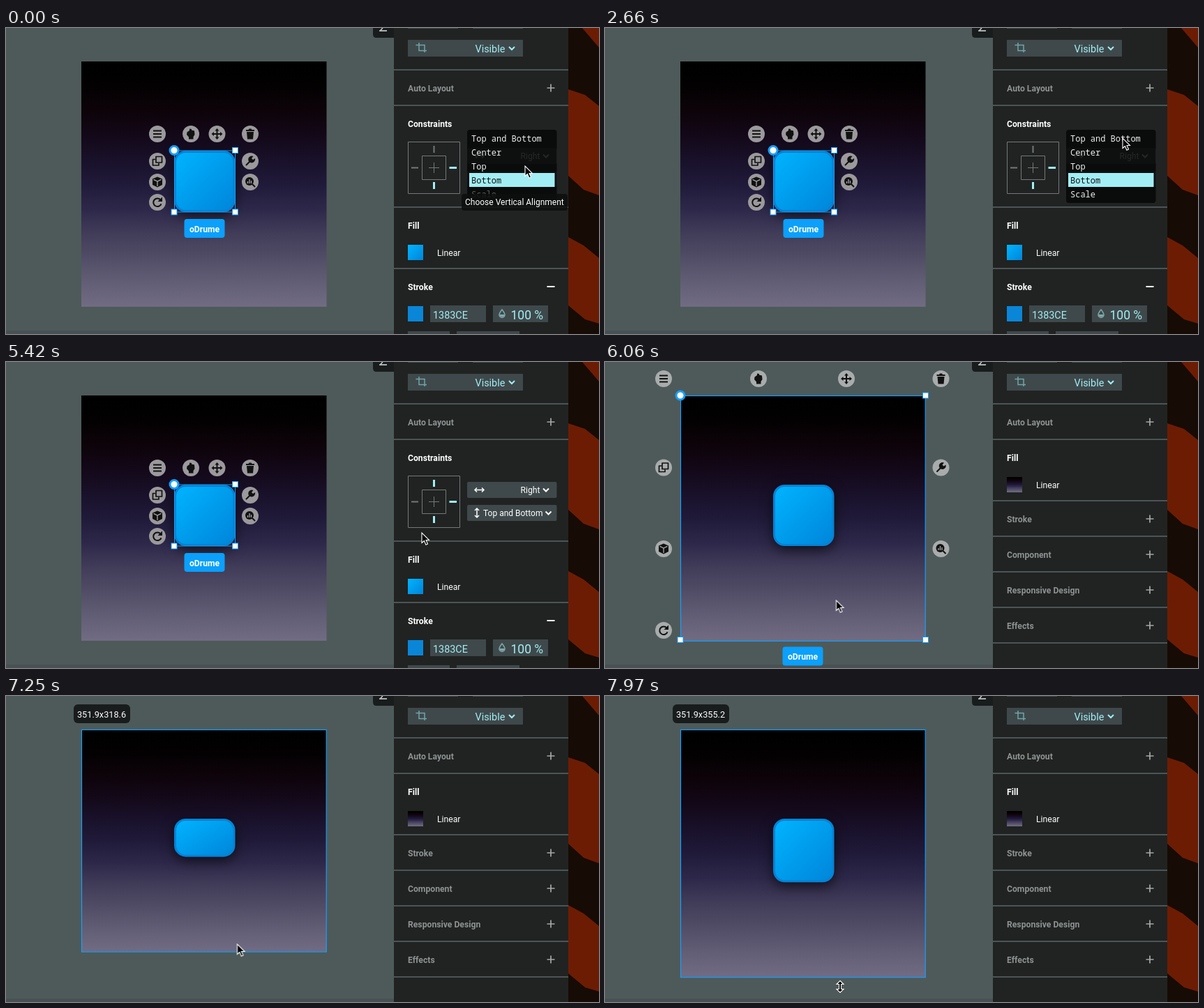
Write an HTML page that moves like this. It is 850 by 439 pixels and loops after 8000 ms.

```html
<!DOCTYPE html>
<html lang="en">
<head>
<meta charset="utf-8">
<title>Layout constraints</title>
<style>
html, body { margin: 0; width: 100%; height: 100%; overflow: hidden; background: #4e5a59; }
svg { display: block; }
text { font: 12.2px Roboto, sans-serif; fill: #fff; }
.b { font-weight: 700; }
.dim { fill: #8e9292; }
.mono text { font: 12px "Noto Sans Mono", monospace; fill: #eee; }
.cyan { fill: #a2eef5; }
.field { fill: #3f494b; }
.rule { stroke: #4d5455; stroke-width: 2; }
.line { fill: none; stroke: #747878; }
.blue { fill: none; stroke: #159fff; }
.knob rect { fill: #fff; stroke: #159fff; }
.knob circle { fill: #fff; stroke: #159fff; stroke-width: 3; }
.tag { fill: #0aa0fb; }
.glyph { fill: none; stroke: #111; stroke-width: 2; }
.solid { fill: #111; stroke: none; }

#board, #outline { height: calc(var(--h) * 1px); }
#tile { height: calc(var(--h) * 1px - 266.9px); filter: drop-shadow(0 5px 9px #000a); }

.tool, .menu, .tip, .scale, .before, .after, .picked, .drag, .topOn, .arrow, .resize {
  animation: 8s step-end infinite;
}
.before { animation-name: before; }
.after { animation-name: after; }
.picked { animation-name: picked; }
.drag { animation-name: drag; }
.menu { animation-name: menu; }
.topOn { animation-name: topOn; }
.arrow { animation-name: arrow; }
.resize { animation-name: resize; }
.tip { animation-name: tip; animation-timing-function: linear; }
.scale { animation-name: scale; animation-timing-function: linear; }
.cursor { animation: move 8s step-end infinite; }

@keyframes before { 75.75%, to { visibility: hidden; } }
@keyframes after { 0% { visibility: hidden; } 75.75%, to { visibility: visible; } }
@keyframes picked { 0%, 86.875%, to { visibility: hidden; } 75.75% { visibility: visible; } }
@keyframes drag { 0% { visibility: hidden; } 86.875%, to { visibility: visible; } }
@keyframes menu { 39.125%, to { visibility: hidden; } }
@keyframes topOn { 0% { visibility: hidden; } 39.125%, 75.74% { visibility: visible; } 75.75%, to { visibility: hidden; } }
@keyframes arrow { 81.625%, 98.125%, to { visibility: hidden; } 86.875% { visibility: visible; } }
@keyframes resize { 0%, 86.875% { visibility: hidden; } 81.625%, 98.125%, to { visibility: visible; } }
@keyframes tip { 0%, .75% { opacity: 1; } 4.25%, to { opacity: 0; } }
@keyframes scale { 0%, .75% { opacity: .35; } 4.25%, to { opacity: 1; } }
@keyframes move {
  0% { transform: translate(744px, 198px); }
  25.25% { transform: translate(752px, 215px); }
  26% { transform: translate(752px, 217px); animation-timing-function: steps(10); }
  33.25% { transform: translate(742px, 158px); }
  46.625% { transform: translate(701px, 146px); animation-timing-function: steps(2); }
  47.9% { transform: translate(632px, 141px); animation-timing-function: steps(2); }
  49.2% { transform: translate(583px, 155px); animation-timing-function: steps(2); }
  50.875% { transform: translate(616px, 178px); }
  55.25% { transform: translate(616px, 178px); animation-timing-function: steps(8, start); }
  60.25% { transform: translate(617px, 224px); }
  67.75% { transform: translate(596px, 245px); animation-timing-function: steps(7); }
  72.75% { transform: translate(331.5px, 342px); }
  78.75% { transform: translate(331.5px, 342px); animation-timing-function: steps(6, start); }
  82.375% { transform: translate(331.5px, 400px); }
  86.875% { transform: translate(331.5px, 398px); animation-timing-function: steps(5); }
  90.625% { transform: translate(331.5px, 356px); animation-timing-function: steps(4); }
  93.625% { transform: translate(331.5px, 334px); }
  95.875% { transform: translate(331.5px, 341px); animation-timing-function: steps(5); }
  99.625%, to { transform: translate(337px, 417px); }
}
</style>
</head>
<body>
<svg width="850" height="439" viewBox="0 0 850 439" style="--h: 351.9">
  <defs>
    <linearGradient id="dusk" x2="0" y2="1">
      <stop stop-color="#000"/>
      <stop offset=".1" stop-color="#030102"/>
      <stop offset=".2" stop-color="#0d0309"/>
      <stop offset=".3" stop-color="#130818"/>
      <stop offset=".4" stop-color="#19112a"/>
      <stop offset=".5" stop-color="#201a39"/>
      <stop offset=".6" stop-color="#2d2849"/>
      <stop offset=".7" stop-color="#413c58"/>
      <stop offset=".8" stop-color="#514d66"/>
      <stop offset=".9" stop-color="#625e76"/>
      <stop offset="1" stop-color="#716c84"/>
    </linearGradient>
    <linearGradient id="sky" x2="1" y2="1">
      <stop stop-color="#00b4ff"/>
      <stop offset="1" stop-color="#0085da"/>
    </linearGradient>
    <path id="plus" d="M-5.5 0H5.5M0-5.5V5.5" fill="none" stroke="#a5a8a8" stroke-width="1.7"/>
    <path id="chev" d="M-4-2 0 2 4-2" fill="none" stroke-width="2"/>

    <g id="menu" class="glyph"><path d="M-6-4.5H6M-6 0H6M-6 4.5H6"/></g>
    <path id="hand" class="solid" d="M-5.5-2.5-2-5V-7.5L1-7V-5.5L5-4.5 5.5 1 3.5 4V7.5H-3V4.5L-6 1Z"/>
    <g id="pan"><path class="glyph" d="M-6 0H6M0-6V6"/>
      <path class="solid" d="M0-8 3-4.5H-3ZM0 8 3 4.5H-3ZM-8 0-4.5-3V3ZM8 0 4.5-3V3Z"/></g>
    <path id="trash" class="solid" d="M-6-6H-2.5L-1.5-7.5H1.5L2.5-6H6V-4H-6ZM-5-3H5L4 7.5H-4Z"/>
    <g id="copy" class="glyph" stroke-linejoin="round"><path d="M-2-6.5H6.5V2H-2ZM-3-2.5H-6.5V6H2V3" stroke-width="1.7"/></g>
    <g id="wrench"><path class="glyph" d="M-5.5 5.5 2-2" stroke-width="3.4" stroke-linecap="round"/>
      <path class="solid" d="M4.5-7A5 5 0 1 0 7-4L4-2 2-4Z"/></g>
    <g id="cube"><path class="solid" d="M0-7.5 7-4.5V4L0 7.5-7 4V-4.5Z"/>
      <path d="M-5.5-3.6 0-1 5.5-3.6M0-1V6" fill="none" stroke="#aaa" stroke-width="1.3"/></g>
    <g id="lens"><circle class="solid" cx="-1" cy="-1" r="6"/><path class="glyph" d="M3 3 7 7" stroke-width="2.8"/>
      <path d="M-3.5 2V-1M-1 2V-4M1.5 2V-2" stroke="#aaa" stroke-width="1.3"/></g>
    <g id="turn"><path class="glyph" d="M4.5-3.5A5.8 5.8 0 1 0 5.5 2.3"/>
      <path class="solid" d="M7-7.5V-1H.5Z"/></g>
  </defs>

  <rect width="850" height="439" fill="#4e5a59"/>
  <rect y="434" width="556" height="5" fill="#485255"/>
  <rect id="board" x="108" y="48" width="351.5" fill="url(#dusk)"/>
  <rect id="tile" x="242.5" y="177.5" width="84.5" rx="15" fill="url(#sky)" stroke="#0782d4" stroke-width="3"/>

  <g class="before">
    <rect class="blue" x="241.5" y="176" width="87" height="88"/>
    <g id="smallTools"></g>
    <rect class="tag" x="255.5" y="274" width="58" height="27" rx="4"/>
    <text class="b" x="284.5" y="292.5" text-anchor="middle">oDrume</text>
  </g>

  <rect id="outline" class="blue after" x="108.5" y="48.5" width="350.7" stroke-width="1.2"/>
  <g class="picked">
    <g id="largeTools"></g>
    <rect class="tag" x="254.5" y="408.5" width="58" height="27" rx="4"/>
    <text class="b" x="283.5" y="427" text-anchor="middle">oDrume</text>
  </g>
  <g class="drag">
    <rect x="97" y="12" width="81" height="27" rx="6" fill="#191c1d"/>
    <text id="size" x="137" y="31" text-anchor="middle" style="font-size:12.7px"></text>
  </g>

  <!-- backdrop beside the panel -->
  <rect x="806" width="44" height="439" fill="#6d1c04"/>
  <path fill="#170b05" d="M806 0H826L850 28V112L830 96 806 88ZM806 212 828 232 850 240V330L828 312 806 300ZM806 398 830 418 850 424V439H806Z"/>

  <!-- side panel -->
  <path d="M526 0H556V14H531Q526 14 526 9Z" fill="#191c1d"/>
  <path d="M535 4H546M537 3 540 0" stroke="#ddd" stroke-width="1.4"/>
  <rect x="556" width="250" height="439" fill="#202322"/>
  <path class="field" d="M576 0H648V1H576ZM669 0H741V1H669ZM576 17H741V41H576Z"/>
  <path d="M590 24.500H600V35M592 21V32.500H603M587.500 24.500H590" fill="none" stroke="#6fa5aa" stroke-width="1.5"/>
  <text class="cyan" x="672.500" y="34.500" style="font-size:14.400px">Visible</text>
  <use href="#chev" x="725" y="29" stroke="#a2eef5"/>
  <path class="rule" d="M556 60H806M556 111H806"/>
  <text class="b dim" x="576" y="91">Auto Layout</text>
  <use href="#plus" x="781" y="86"/>

  <g class="before">
    <text class="b" x="576" y="142">Constraints</text>
    <path class="line" d="M576.5 163.500H650.500V237.500H576.500ZM596.500 183.500H630.500V217.500H596.500ZM606 200.500H621M613.500 193V208"/>
    <path class="line" d="M581 200.500H591M613.500 169V179" stroke-width="2"/>
    <path d="M635.500 200.500H646M613.500 221V231" stroke="#a2eef5" stroke-width="3"/>
    <rect class="field" x="661" y="172" width="128.500" height="23" rx="2"/>
    <path d="M672 183.500H685M675 180.500 672 183.500 675 186.500M682 180.500 685 183.500 682 186.500" fill="none" stroke="#fff" stroke-width="1.500"/>
    <text x="737.500" y="188">Right</text>
    <use href="#chev" x="774" y="183.500" stroke="#fff"/>
    <rect class="field" x="661" y="205" width="128.500" height="23" rx="2"/>
    <path d="M675 210V223M672 213 675 210 678 213M672 220 675 223 678 220" fill="none" stroke="#fff" stroke-width="1.500"/>
    <text x="684" y="221" style="font-size:12px">Top and Bottom</text>
    <use href="#chev" x="777.500" y="216.500" stroke="#fff"/>

    <path class="rule" d="M556 257H806M556 345H806"/>
    <text class="b" x="576" y="288">Fill</text>
    <rect x="576" y="311" width="22" height="22" fill="url(#sky)"/>
    <text x="618" y="327">Linear</text>
    <text class="b" x="576" y="376">Stroke</text>
    <path d="M775.500 371H786.500" stroke="#fff" stroke-width="2"/>
    <rect x="576" y="399" width="22" height="22" fill="#0a86d8"/>
    <path class="field" d="M608 398H688V422H608ZM698 398H777V422H698ZM576 435H636V439H576ZM646 435H736V439H646Z"/>
    <text class="cyan" x="612" y="416.500" style="font-size:14.400px">1383CE</text>
    <path d="M711 404Q715 409 715 411.500A4 4 0 0 1 707 411.500Q707 409 711 404Z" fill="none" stroke="#7fa9ad" stroke-width="1.500"/>
    <path d="M707.500 411H714.500A3.500 3.500 0 0 1 707.500 411Z" fill="#7fa9ad"/>
    <text class="cyan" x="723.500" y="417.500" style="font-size:17.500px">100 %</text>
  </g>
  <path class="topOn" d="M613.500 169V179" stroke="#a2eef5" stroke-width="3"/>

  <g class="menu mono">
    <rect x="661" y="146" width="128.500" height="105" rx="4" fill="#070808" fill-opacity=".88"/>
    <rect class="cyan" x="664" y="208" width="122.500" height="20"/>
    <text x="667" y="163">Top and Bottom</text>
    <text x="667" y="183">Center</text>
    <text x="667" y="203">Top</text>
    <text x="667" y="223" style="fill:#111">Bottom</text>
    <text class="scale" x="667" y="243">Scale</text>
  </g>
  <g class="tip">
    <rect x="653" y="238" width="152" height="24" rx="4" fill="#0d0f0f" fill-opacity=".85"/>
    <text x="658" y="254" style="font-size:12px">Choose Vertical Alignment</text>
  </g>

  <g class="after">
    <text class="b" x="576" y="142">Fill</text>
    <rect x="576" y="165" width="22" height="22" fill="url(#dusk)"/>
    <text x="618" y="181">Linear</text>
    <g id="sections"></g>
  </g>

  <g class="cursor">
    <path class="arrow" d="M0 0V14.500L3.400 11.500 5.900 17.200 8.500 16 6 10.500H10.500Z" fill="#000" stroke="#fff" stroke-width="1.100"/>
    <path class="resize" d="M0-8.500 5-3.500H1.500V3.500H5L0 8.500-5 3.500H-1.500V-3.500H-5Z" fill="#000" stroke="#fff" stroke-width="1.100"/>
  </g>
</svg>
<script>
const $ = id => document.getElementById(id);

// Round tool buttons and corner knobs around a selected box
function tools(id, tint, [x1, y1, x2, y2], [l, a, b, r], [top, y, mid, end]) {
  const spots = [
    ['menu', l, top], ['hand', a, top], ['pan', b, top], ['trash', r, top],
    ['copy', l, y], ['wrench', r, y], ['cube', l, mid], ['lens', r, mid], ['turn', l, end]
  ];
  const buttons = spots.map(([name, cx, cy]) =>
    `<circle cx="${cx}" cy="${cy}" r="12" fill="${tint}"/><use href="#${name}" x="${cx}" y="${cy}"/>`);
  const knobs = [[x2, y1], [x1, y2], [x2, y2]].map(([x, y]) =>
    `<rect x="${x - 4}" y="${y - 4}" width="8" height="8"/>`);
  $(id).innerHTML = buttons.join('') +
    `<g class="knob">${knobs.join('')}<circle cx="${x1}" cy="${y1}" r="6"/></g>`;
}
tools('smallTools', '#9c999c', [241, 175.5, 328.5, 264], [217, 265, 302.5, 350], [152, 191, 221, 250]);
tools('largeTools', '#a9acac', [108, 48, 459.5, 398.5], [84, 220, 346, 481.5], [24, 151.5, 268, 385]);

$('sections').innerHTML = ['Stroke', 'Component', 'Responsive Design', 'Effects', ''].map((name, i) => {
  const y = 199 + 51 * i;
  const row = `<text class="b dim" x="576" y="${y + 31}">${name}</text><use href="#plus" x="781" y="${y + 26}"/>`;
  return `<path class="rule" d="M556 ${y}H806"/>` + (name && row);
}).join('');

// Board height while its lower edge is dragged: [ms since grab, height]
const LOOP = 8000, GRAB = 6950, STEP = 60;
const pulls = [[0, 351.9], [300, 318.6], [540, 293], [720, 293], [1020, 355.2]];

function heightAt(t) {
  const s = Math.max(0, Math.floor((t - GRAB) / STEP) * STEP);
  const i = Math.max(1, pulls.findIndex(p => p[0] >= s));
  const [t0, h0] = pulls[i - 1], [t1, h1] = pulls[i];
  return h0 + (h1 - h0) * (s - t0) / (t1 - t0);
}

const stage = document.querySelector('svg');
let start;
function draw(now) {
  start ??= now;
  const h = heightAt((now - start) % LOOP);
  stage.style.setProperty('--h', h);
  $('size').textContent = '351.9x' + h.toFixed(1);
  requestAnimationFrame(draw);
}
requestAnimationFrame(draw);
</script>
</body>
</html>
```
